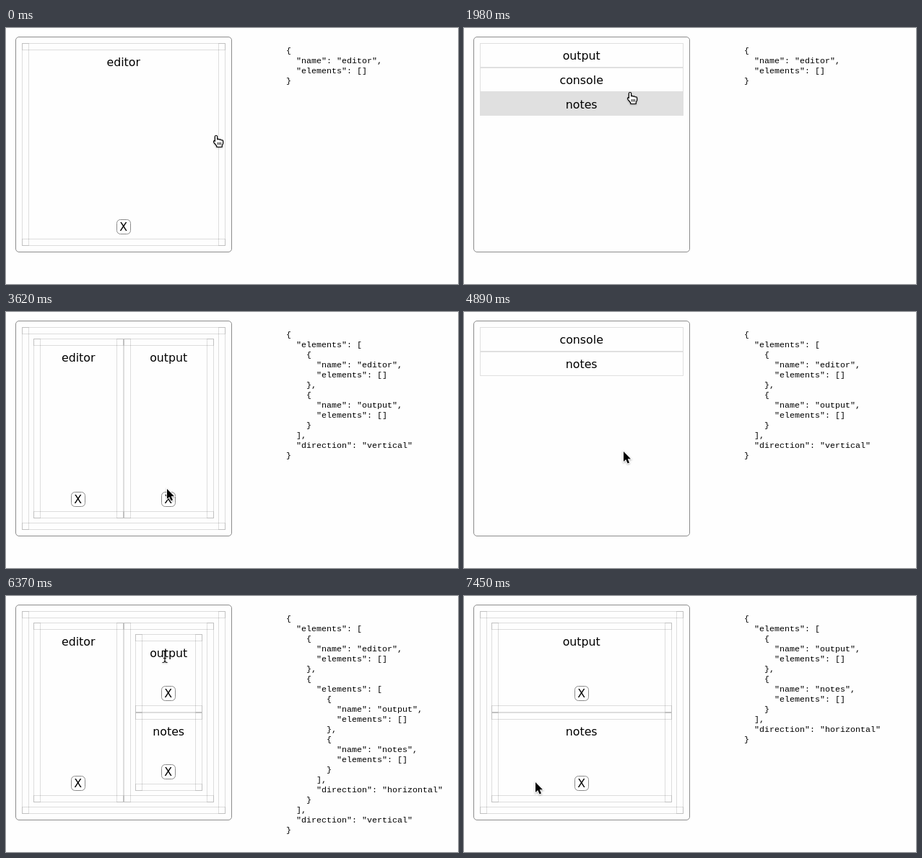
These frames come from a looping animation (626 by 356 pixels, 8000 ms). An HTML page:

```html
<!DOCTYPE html>
<html lang="en">
<head>
<meta charset="utf-8">
<title>Layout editor</title>
<style>
  html, body { margin: 0; width: 626px; height: 356px; overflow: hidden; background: #fefefe; }
  svg { display: block; }
  .label { font: 15.8px "DejaVu Sans", Verdana, sans-serif; text-anchor: middle; }
  .code { font: 11.66px "Liberation Mono", Courier, monospace; }
  .bar { fill: none; stroke: #000; stroke-opacity: .13; }
  .button { fill: #fefefe; stroke: #8c8c8c; }
  .row { fill: #fefefe; stroke: #e0e0e0; }
  .row.hot, .button.hot { fill: #e0e0e0; }
  #cursor { filter: drop-shadow(0 1px 1px rgba(0, 0, 0, .3)); }
</style>
</head>
<body>
<svg width="626" height="356" viewBox="0 0 626 356">
  <rect x="13.5" y="12.5" width="299" height="299" rx="4.5" fill="none" stroke="#8c8c8c"/>
  <g id="panel"></g>
  <g id="code" class="code"></g>
  <g id="cursor"></g>
</svg>
<script>
const LOOP = 8000;
const BAR = 10, INSET = 16, ROW = 34;
const ROOT = { x: 22, y: 21, w: 282, h: 282 };

const leaf = name => ({ name, elements: [] });
const split = (direction, ...elements) => ({ elements, direction });

const single = leaf("editor");
const columns = split("vertical", leaf("editor"), leaf("output"));
const rows = split("horizontal", leaf("output"), leaf("notes"));
const nested = split("vertical", leaf("editor"), rows);

const scenes = [
  { at: 0, tree: single },
  { at: 740, tree: single, list: ["output", "console", "notes"] },
  { at: 2690, tree: columns },
  { at: 4510, tree: columns, list: ["console", "notes"] },
  { at: 5620, tree: nested },
  { at: 7450, tree: rows }
];

// Pointer moves: start, end, number of steps, destination
const START = [291, 149];
const moves = [
  [30, 200, 4, 299, 148],
  [1430, 1770, 7, 234, 101],
  [1920, 1978, 2, 230, 89],
  [2037, 2270, 5, 226, 43],
  [3230, 3620, 8, 223, 246],
  [3675, 4000, 8, 222, 276],
  [4060, 4180, 3, 222, 281],
  [4750, 4890, 3, 221, 194],
  [4943, 5440, 11, 221, 82],
  [6370, 7160, 16, 99, 259]
];

// The hand shape lingers for a while after the layout changes
const lingering = [[0, 30], [740, 1190], [4510, 4750], [5620, 5680]];

const cursors = {
  arrow: `<path d="M0 0V14L3.2 11L5.6 16.6L8 15.6L5.7 10.2H10Z" stroke="#fff" stroke-width="1.8" paint-order="stroke"/>`,
  hand: `<path d="M-1.6 9V2Q-1.6 .5 0 .5T1.6 2V6Q3 4.8 4.3 6.3Q5.8 5.4 7 7Q9.6 6.2 9.6 8.6V11.5L8.2 14.3V16.5H.8V15L-3 10.3Q-4 8.4-2.8 7.8T-1.6 9" fill="#fff" stroke="#000" stroke-width="1.2" stroke-linejoin="round"/>
    <path d="M2.5 10V13.5M4.5 10V13.5M6.5 10V13.5" stroke="#000" stroke-width=".9"/>`,
  text: `<path d="M-3.5-8Q0-8 0-5.5Q0-8 3.5-8M-3.5 8.5Q0 8.5 0 6Q0 8.5 3.5 8.5M0-5.5V6M-2 2.5H2" fill="none" stroke="#000" stroke-width="1.1"/>`
};

const inside = (p, b) => p.x >= b.x && p.x < b.x + b.w && p.y >= b.y && p.y < b.y + b.h;

const rect = (b, cls, radius = 0) =>
  `<rect class="${cls}" x="${b.x + .5}" y="${b.y + .5}" width="${b.w - 1}" height="${b.h - 1}" rx="${radius}"/>`;

const label = (s, x, y) => `<text class="label" x="${x}" y="${y}">${s}</text>`;

const barsOf = ({ x, y, w, h }) => [
  { x, y, w, h: BAR },
  { x, y: y + h - BAR, w, h: BAR },
  { x, y, w: BAR, h },
  { x: x + w - BAR, y, w: BAR, h }
];

const buttonOf = b => ({ x: b.x + Math.floor(b.w / 2) - 10, y: b.y + b.h - 37, w: 20, h: 21 });
const titleOf = b => ({ x: b.x + b.w / 2 - 26, y: b.y + 17, w: 52, h: 19 });

function childBoxes(node, b) {
  const n = node.elements.length;
  const x = b.x + INSET, y = b.y + INSET, w = b.w - 2 * INSET, h = b.h - 2 * INSET;
  return node.elements.map((_, i) => node.direction === "vertical"
    ? { x: x + i * w / n, y, w: w / n, h }
    : { x, y: y + i * h / n, w, h: h / n });
}

function drawNode(node, b, p, out) {
  const bars = barsOf(b);
  for (const bar of bars) out.svg += rect(bar, "bar");
  const hot = bars.find(bar => inside(p, bar));
  if (hot) {
    out.kind = "hand";
    out.svg += `<rect x="${hot.x}" y="${hot.y}" width="${hot.w}" height="${hot.h}"/>`;
  }
  if (node.name) {
    const mid = b.x + b.w / 2 - .3, button = buttonOf(b);
    out.svg += label(node.name, mid, b.y + 32);
    out.svg += rect(button, inside(p, button) ? "button hot" : "button", 5);
    out.svg += label("X", button.x + 9.7, b.y + b.h - 21);
    if (!hot && inside(p, titleOf(b))) out.kind = "text";
  }
  const boxes = childBoxes(node, b);
  node.elements.forEach((child, i) => drawNode(child, boxes[i], p, out));
}

function drawList(names, p, out) {
  names.forEach((name, i) => {
    const b = { x: ROOT.x, y: ROOT.y + i * ROW, w: ROOT.w, h: i === 2 ? ROW - 1 : ROW };
    const hot = inside(p, b);
    if (hot) out.kind = "hand";
    out.svg += rect(b, hot ? "row hot" : "row") + label(name, b.x + b.w / 2 - .3, b.y + 23);
  });
}

function drawCode(tree) {
  return JSON.stringify(tree, null, 2).split("\n").map((line, i) => {
    const s = line.trimStart();
    return `<text x="${388 + 7 * (line.length - s.length)}" y="${35 + 14 * i}">${s}</text>`;
  }).join("");
}

function pointerAt(t) {
  let [x, y] = START;
  for (const [t0, t1, n, toX, toY] of moves) {
    if (t < t0) break;
    const step = Math.min(n, Math.floor((t - t0) / (t1 - t0) * (n - 1) + 1e-6) + 1);
    const k = step / n;
    const ease = n > 10 ? k * k * (3 - 2 * k) : k;
    x += (toX - x) * ease;
    y += (toY - y) * ease;
  }
  return { x: Math.round(x), y: Math.round(y) };
}

const shown = {};
function put(id, svg) {
  if (shown[id] === svg) return;
  shown[id] = svg;
  document.getElementById(id).innerHTML = svg;
}

function render(t) {
  const scene = scenes.findLast(s => t >= s.at);
  const p = pointerAt(t);
  const out = { svg: "", kind: "arrow" };
  if (scene.list) drawList(scene.list, p, out);
  else drawNode(scene.tree, ROOT, p, out);
  if (lingering.some(([a, b]) => t >= a && t < b)) out.kind = "hand";
  put("panel", out.svg);
  put("code", drawCode(scene.tree));
  put("cursor", `<g transform="translate(${p.x} ${p.y})">${cursors[out.kind]}</g>`);
}

const begin = performance.now();
function tick() {
  render((performance.now() - begin) % LOOP);
  requestAnimationFrame(tick);
}
tick();
</script>
</body>
</html>
```
